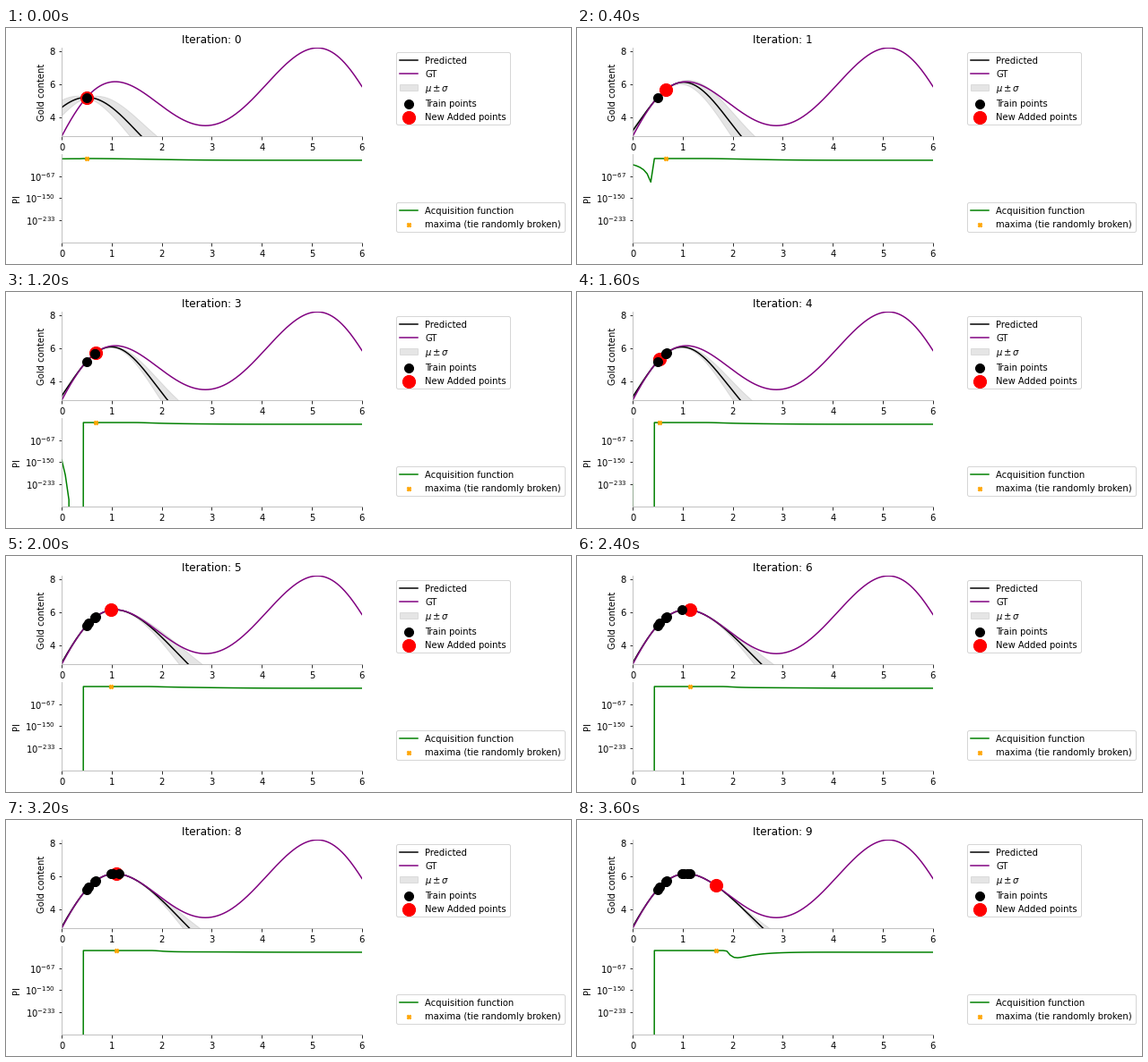
These frames come from a looping animation (630x264 px, 4 s). A matplotlib script:

```python
import math

import matplotlib.pyplot as plt
import numpy as np
from matplotlib.animation import FuncAnimation

W, H, DPI = 630, 264, 72
FRAMES, STEP = 10, 400

plt.rcParams["font.family"] = "DejaVu Sans"
plt.rcParams["font.size"] = 10

# Ground truth: a degree-6 polynomial given by its turning points.
slope = -np.poly1d([1.07, 2.87, 5.11], r=True) * np.poly1d([-0.0668, 0.3978, 0.3628])
truth = slope.integ(k=2.87)

x = np.linspace(0, 6, 601)
y = truth(x)
samples = [0.5, 0.66, 0.66, 0.68, 0.54, 0.985, 1.15, 1.02, 1.1, 1.66]

# The acquisition is scored on a coarse grid; the far left has to beat a higher bar.
EDGE = 0.43
grid = np.linspace(0, 6, 84)
goal = truth(EDGE) + np.where(grid < EDGE, 0.33, 0.0)


def kernel(a, b):
    return np.exp(-0.5 * (a[:, None] - b[None, :]) ** 2)


def posterior(pts, at):
    """Mean and deviation of a zero-mean GP with a unit RBF kernel."""
    pts = np.array(pts)
    cov = kernel(pts, pts) + 1e-7 * np.eye(len(pts))
    cross = kernel(at, pts)
    gain = np.linalg.solve(cov, cross.T).T
    var = 1 - np.sum(gain * cross, axis=1)
    return gain @ truth(pts), np.sqrt(np.maximum(var, 1e-10))


def log_pi(mean, dev):
    """log10 of the probability of improvement; underflow drops off the plot."""
    z = (mean - goal) / dev
    prob = [0.5 * math.erfc(-v / math.sqrt(2)) for v in z]
    return np.array([math.log10(p) if p > 0 else -1e4 for p in prob])


def add_axes(top):
    height = 98.84
    ax = fig.add_axes([62.1 / W, 1 - (top + height) / H, 334.8 / W, height / H])
    ax.set_xlim(0, 6)
    ax.set_xticks(range(7))
    ax.tick_params(axis="x", pad=4.5)
    for side in ("top", "right"):
        ax.spines[side].set_visible(False)
    for side in ("left", "bottom"):
        ax.spines[side].set_color("0.7")
    return ax


def add_legend(ax, height):
    box = ax.legend(loc="upper left", bbox_to_anchor=(1.1, height))
    for text in box.get_texts():
        text.set_y(-1)


fig = plt.figure(figsize=(W / DPI, H / DPI), dpi=DPI, facecolor="white")

ax = add_axes(22.25)
ax.set_ylim(y.min(), y.max())
ax.set_yticks([4, 6, 8])
ax.set_ylabel("Gold content")
title = ax.set_title("Iteration: 0", fontsize=12, pad=5)
pred, = ax.plot(x, y, color="black", label="Predicted")
ax.plot(x, y, color="purple", label="GT")
band = ax.fill_between(x, y, y, color="gray", alpha=0.2, label=r"$\mu \pm \sigma$")
train = ax.scatter([0], [0], s=100, color="black", zorder=5, label="Train points")
new = ax.scatter([0], [0], s=200, color="red", zorder=4, label="New Added points")
add_legend(ax, 1)

acq = add_axes(140.86)
acq.set_ylim(-317.5, 17.5)
powers = [-67, -150, -233]
acq.set_yticks(powers, [rf"$\mathdefault{{10^{{{p}}}}}$" for p in powers])
acq.set_ylabel("PI")
curve, = acq.plot(grid, 0 * grid, color="green", label="Acquisition function")
best = acq.scatter([0], [0], s=20, marker="X", color="orange", zorder=5,
                   label="maxima (tie randomly broken)")
add_legend(acq, 0.5)


def update(n):
    pts = samples[:n + 1]
    mean, dev = posterior(pts, x)
    score = log_pi(*posterior(pts, grid))
    seen = np.array(samples[:max(1, n)])
    spot = samples[n]

    title.set_text(f"Iteration: {n}")
    pred.set_ydata(mean)
    outline = np.r_[mean - dev, (mean + dev)[::-1]]
    band.set_verts([np.column_stack([np.r_[x, x[::-1]], outline])])
    train.set_offsets(np.column_stack([seen, truth(seen)]))
    new.set_offsets([[spot, truth(spot)]])
    curve.set_ydata(score)
    best.set_offsets([[spot, np.interp(spot, grid, score)]])
    return title, pred, band, train, new, curve, best


anim = FuncAnimation(fig, update, frames=FRAMES, interval=STEP, repeat=True,
                     repeat_delay=0, blit=False)
plt.show()
```
